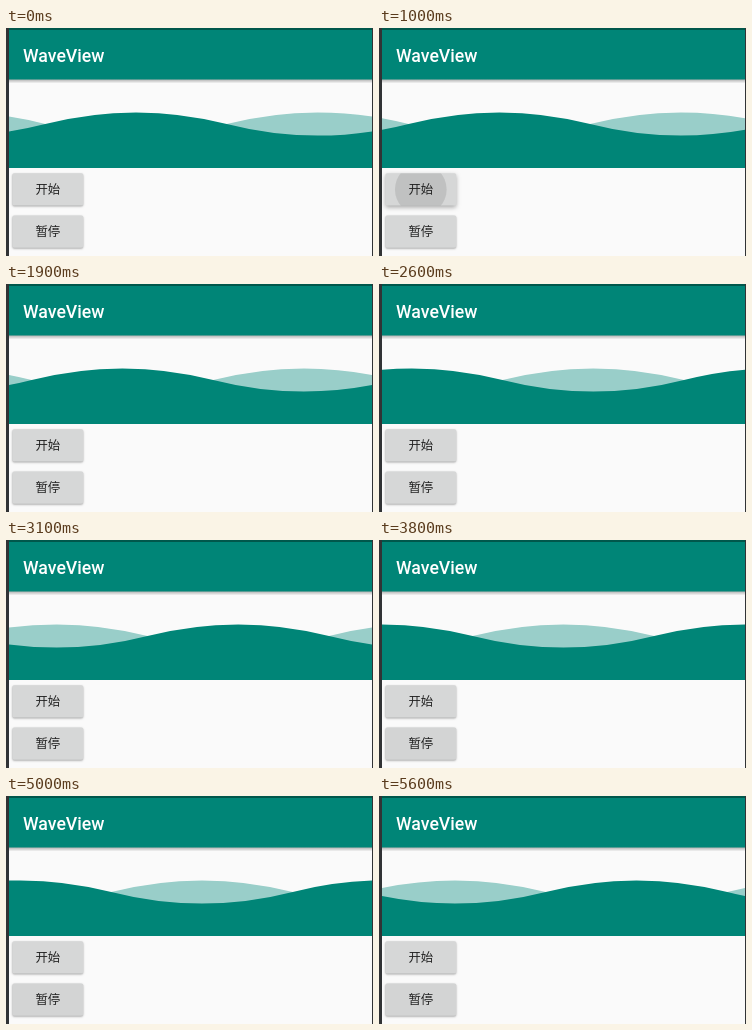
Write an HTML page with a canvas that moves like this. It is 367x228 px and loops after 5700 ms.

```html
<!DOCTYPE html>
<html lang="zh">
<head>
<meta charset="utf-8">
<title>WaveView</title>
<style>
  html, body { margin: 0; width: 100%; height: 100%; overflow: hidden; background: #fafafa; }
  canvas { display: block; width: 367px; height: 228px; }
</style>
</head>
<body>
<canvas id="stage"></canvas>
<script>
const W = 367, H = 228, LOOP = 5700, STEP = 100;
const LEFT = 3, RIGHT = 366, SPAN = RIGHT - LEFT, HALF = SPAN / 2;
const MID = 96, AMP = 11.6, FLOOR = 140;
const TEAL = '#008577';

const canvas = document.getElementById('stage');
const ctx = canvas.getContext('2d');
const dpr = window.devicePixelRatio || 1;
canvas.width = W * dpr;
canvas.height = H * dpr;

const clamp = (v, lo = 0, hi = 1) => Math.min(hi, Math.max(lo, v));

function rect(x, y, w, h, color) {
  ctx.fillStyle = color;
  ctx.fillRect(x, y, w, h);
}

// Horizontal position of the front crest: rest, run, pause, restart.
function crestAt(t) {
  if (t < 1000) return 130;
  if (t < 4300) return 94 + 0.399 * (Math.min(t, 3435) - 934);
  return 94 + 0.405 * (t - 4300);
}

function wave(crest, color) {
  const start = ((crest - HALF / 2 - LEFT) % SPAN + SPAN) % SPAN + LEFT - SPAN;
  ctx.beginPath();
  ctx.moveTo(start, MID);
  for (let i = 0; i < 4; i++) {
    const x = start + i * HALF;
    const control = MID + (i % 2 ? 2 : -2) * AMP;
    ctx.quadraticCurveTo(x + HALF / 2, control, x + HALF, MID);
  }
  ctx.lineTo(start + 4 * HALF, FLOOR);
  ctx.lineTo(start, FLOOR);
  ctx.closePath();
  ctx.fillStyle = color;
  ctx.fill();
}

function waves(t) {
  const crest = crestAt(t);
  ctx.save();
  ctx.beginPath();
  ctx.rect(LEFT, 52, SPAN, FLOOR - 52);
  ctx.clip();
  wave(crest + HALF, '#99cec9');
  wave(crest, TEAL);
  ctx.restore();
}

// Touch feedback: a growing ripple that fades to a resting tint.
function touch(t, press, rest = 0) {
  const age = t - press;
  if (age < 0) return { radius: 0, alpha: 0, lift: 0 };
  return {
    radius: 42 * clamp((age + 60) / 260),
    alpha: rest + (0.1 - rest) * (1 - clamp((age - 200) / 300)),
    lift: age < 200 ? clamp((age + 50) / 150) : 1 - clamp((age - 200) / 150)
  };
}

function button(y, label, { radius, alpha, lift }) {
  const x = 6.4, w = 70.8, h = 32.4;
  const box = new Path2D();
  box.roundRect(x, y, w, h, 1.8);

  ctx.save();
  ctx.shadowColor = 'rgba(0,0,0,0.32)';
  ctx.shadowBlur = (2 + 2.5 * lift) * dpr;
  ctx.shadowOffsetY = (0.9 + lift) * dpr;
  ctx.fillStyle = '#d6d7d7';
  ctx.fill(box);
  ctx.restore();

  if (alpha > 0) {
    ctx.save();
    ctx.clip(box);
    ctx.beginPath();
    ctx.arc(x + w / 2, y + h / 2, radius, 0, 2 * Math.PI);
    ctx.fillStyle = `rgba(0,0,0,${alpha})`;
    ctx.fill();
    ctx.restore();
  }

  ctx.font = '12.4px "Noto Sans CJK SC", "Noto Sans CJK", sans-serif';
  ctx.textAlign = 'center';
  ctx.fillStyle = '#212121';
  ctx.fillText(label, x + w / 2, y + 20.6);
}

function appBar() {
  const shade = ctx.createLinearGradient(0, 51.5, 0, 55.5);
  shade.addColorStop(0, 'rgba(0,0,0,0.28)');
  shade.addColorStop(1, 'rgba(0,0,0,0)');
  rect(LEFT, 51, SPAN, 5, shade);
  rect(LEFT, 0, SPAN, 51.5, TEAL);
  rect(LEFT, 0, SPAN, 2, '#00574b');
  ctx.font = '500 17.7px Roboto, sans-serif';
  ctx.textAlign = 'left';
  ctx.fillStyle = '#fff';
  ctx.fillText('WaveView', 17, 34);
}

function draw(t) {
  ctx.setTransform(dpr, 0, 0, dpr, 0, 0);
  rect(0, 0, W, H, '#fafafa');
  waves(t);
  appBar();
  button(145.2, '开始', touch(t, t < 4300 ? 900 : 4300));
  button(187.4, '暂停', touch(t, 3300, 0.015));
  rect(0, 0, LEFT, H, '#313335');
  rect(RIGHT, 0, W - RIGHT, H, '#313335');
}

const begin = performance.now();
function tick() {
  const t = (performance.now() - begin) % LOOP;
  draw(Math.floor(t / STEP) * STEP);
  requestAnimationFrame(tick);
}
tick();
</script>
</body>
</html>
```
